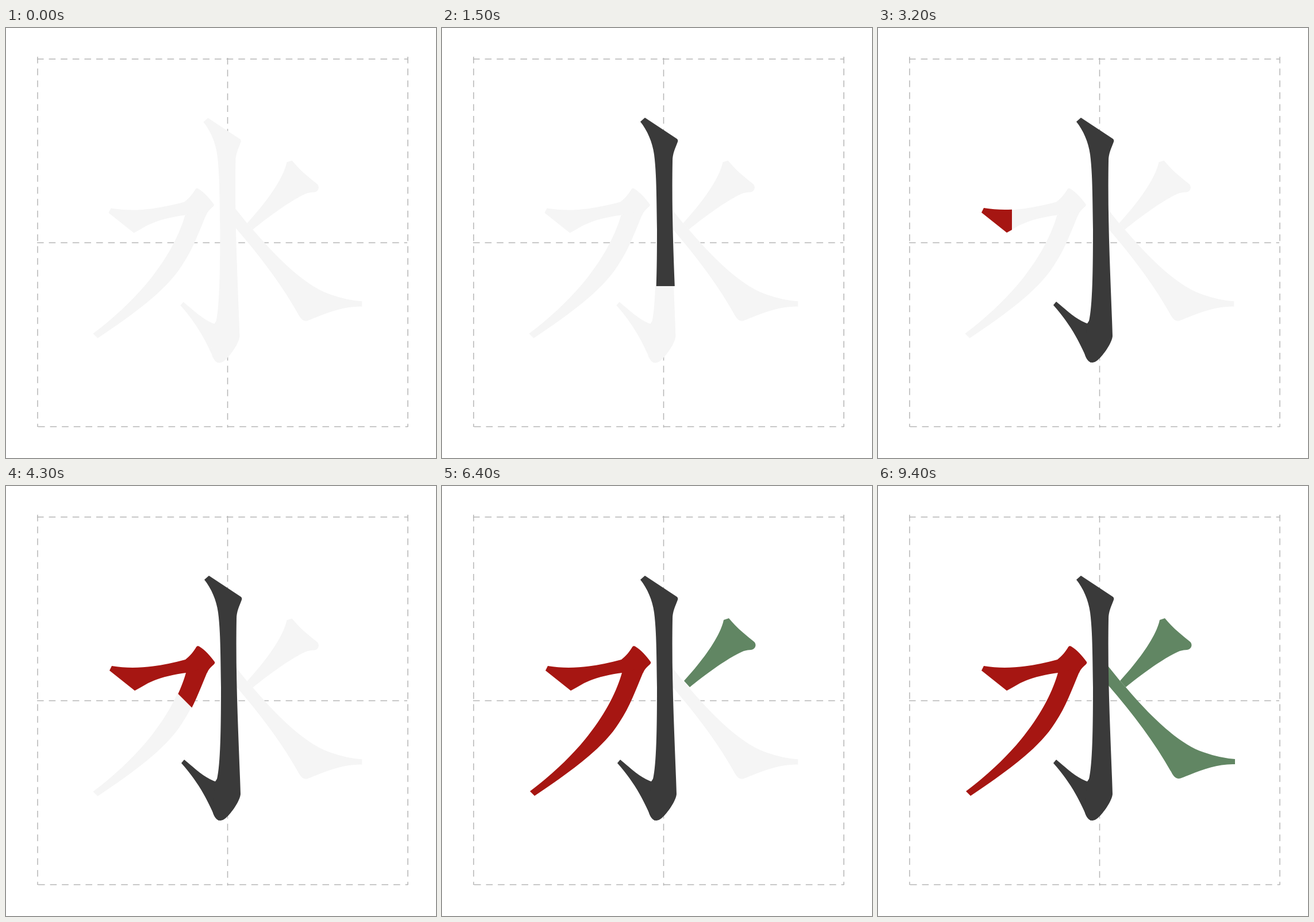
Write an HTML page that moves like this. It is 748x748 px and loops after 9.5 s.

```html
<!DOCTYPE html>
<html lang="zh">
<head>
<meta charset="utf-8">
<title>Stroke order</title>
<style>
  html, body { margin: 0; width: 100%; height: 100%; overflow: hidden; background: #fff; }
  svg { display: block; width: 100vw; height: 100vh; }
</style>
</head>
<body>
<svg id="stage" viewBox="0 0 748 748">
  <path d="M54 54H699M54 373.5H698M56 693.5H699M55 50V694M385.5 52V695M699 50V694"
        fill="none" stroke="#b5b5b5" stroke-width="1.5" stroke-dasharray="11.6 9"/>
  <g id="ghost" fill="#f5f5f5" transform="translate(-1.6 .6)"></g>
  <g id="cover"></g>
  <g id="ink"></g>
</svg>
<script>
const LOOP = 9500, TICK = 100;
const DARK = '#3a3a3a', RED = '#a61612', GREEN = '#618663';

// Each part is wiped in along `dir`: edge = from + step * speed, first step at tick `start`.
const parts = [
  { color: GREEN, start: 55, dir: [-1, 1], from: -270, speed: 19,
    d: 'M499 230C512 246 528 259 543 271C548 276 545 284 538 285Q532 285 525 287C500 297 458 328 431 350L421 339C453 304 484 262 490 233Z' },
  { color: GREEN, start: 67, dir: [.8, .6], from: 500.2, speed: 19.8,
    d: 'M400 313L421 339L431 350C475 402 524 449 566 463Q594 473 621 475V484C594 483 567 492 543 502C532 506 527 509 523 509Q517 509 512 501C484 450 445 398 400 346Z' },
  { color: RED, start: 29, dir: [1, 0], from: 165, speed: 17,
    d: 'M184 313C225 320 268 314 312 302C320 296 327 287 331 280Q333 277 336 279C346 285 356 296 363 306Q364 308 362 310C353 318 352 320 350 325L313 325C291 328 267 333 247 343Q235 350 224 356L180 321Z' },
  { color: RED, start: 41, dir: [-1, 1], from: -32.5, speed: 31.6,
    d: 'M313 325C298 378 254 455 153 531L161 539C222 498 280 457 308 412C327 384 338 352 350 324L340 318Z' },
  { color: DARK, start: 24, dir: [-1, -1], from: -930, speed: 29.2,
    d: 'M364 514C344 507 326 489 310 476L305 482C329 509 345 535 359 566Q363 577 370 582L380 560L368 508Z' },
  { color: DARK, start: 2, dir: [0, 1], from: 149.3, speed: 21.4,
    d: 'M353 156L409 193Q411 195 410 198C406 209 401 218 401 231C399 340 405 440 408 536C407 548 392 569 383 577Q374 585 367 580C362 576 359 568 359 560L364 514Q366 514 367 510C373 485 374 420 374 350C373 290 373 250 369 220C366 198 357 178 345 163Z' }
];

const byId = id => document.getElementById(id);

function add(parent, tag, attrs) {
  const el = document.createElementNS('http://www.w3.org/2000/svg', tag);
  for (const key in attrs) el.setAttribute(key, attrs[key]);
  return parent.appendChild(el);
}

parts.forEach((part, i) => {
  const { d, color } = part;
  const clip = add(byId('stage'), 'clipPath', { id: 'wipe' + i });
  const clipped = parent => add(byId(parent), 'g', { 'clip-path': `url(#wipe${i})` });
  part.wipe = add(clip, 'polygon', {});
  add(byId('ghost'), 'path', { d });
  // The ghost disappears wherever ink is laid.
  add(clipped('cover'), 'path', { d, fill: '#fff', stroke: '#fff', transform: 'translate(-1.6 .6)' });
  add(clipped('ink'), 'path', { d, fill: color });
});

// Half plane behind the wipe edge, as a large rectangle.
function halfPlane([nx, ny], edge) {
  const size = 2000, len = Math.hypot(nx, ny);
  const ux = nx / len, uy = ny / len, s = edge / len;
  const corner = (along, side) => [ux * along - uy * side, uy * along + ux * side];
  return [corner(s, -size), corner(s, size), corner(s - size, size), corner(s - size, -size)].join(' ');
}

function draw(ms) {
  const tick = Math.floor(ms / TICK);
  for (const { wipe, start, dir, from, speed } of parts) {
    const step = tick - start + 1;
    wipe.setAttribute('points', step > 0 ? halfPlane(dir, from + step * speed) : '');
  }
}

const begin = performance.now();
function frame() {
  draw((performance.now() - begin) % LOOP);
  requestAnimationFrame(frame);
}
frame();
</script>
</body>
</html>
```
